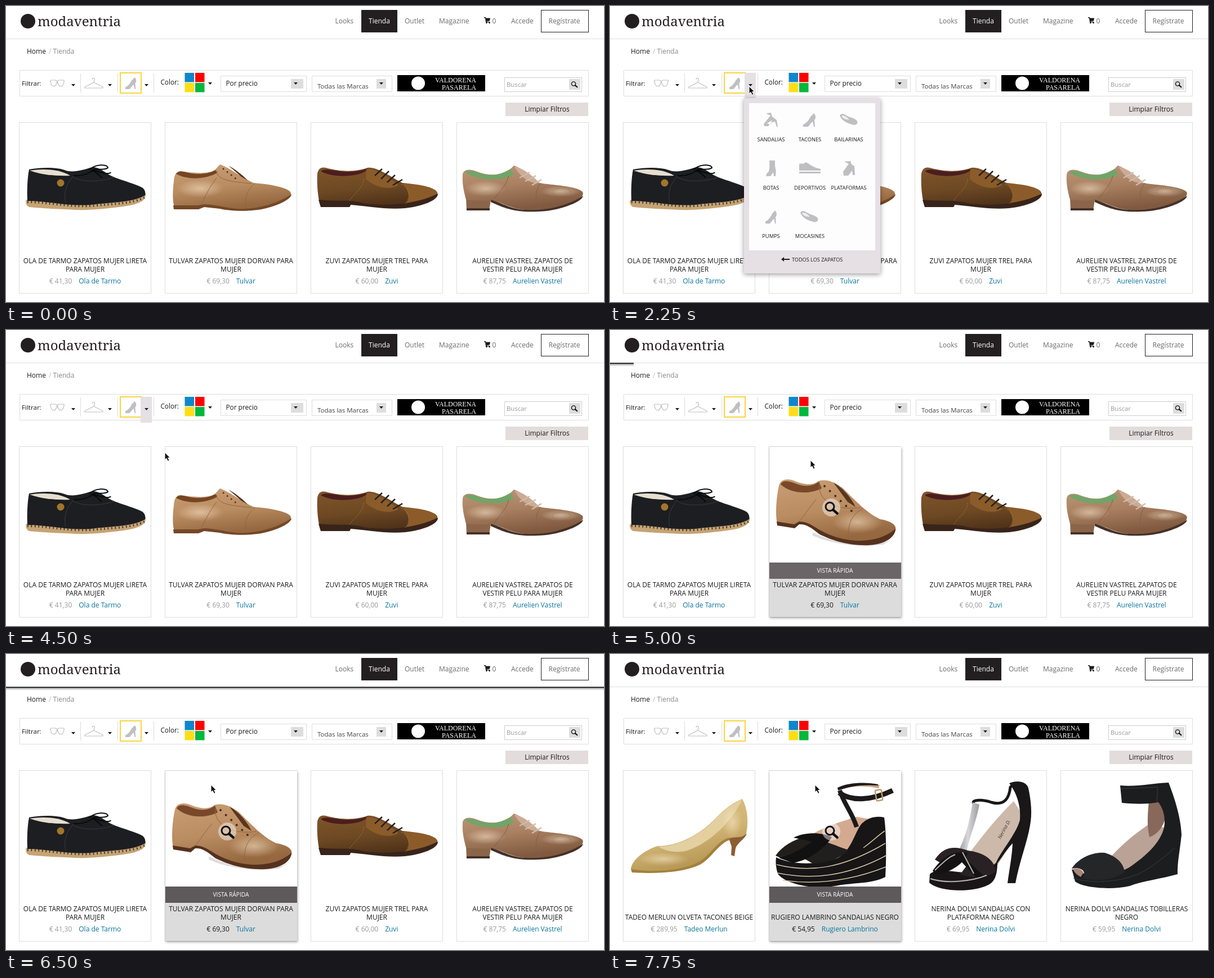
These frames come from a looping animation (1062x527 px, 8000 ms). An HTML page:

```html
<!DOCTYPE html>
<html lang="es">
<head>
<meta charset="utf-8">
<title>Tienda</title>
<style>
html, body { margin: 0; width: 100%; height: 100%; overflow: hidden; background: #fff; }
svg { display: block; width: 1062px; height: 527px; font: 12px "Open Sans", sans-serif; }
.line { fill: none; stroke: #ddd; }
.nav { fill: #6b6b6b; }
.ink { fill: #1c1a1b; }
.link { fill: #08759c; }
.price { fill: #999; }
.mid { text-anchor: middle; }
.small { font-size: 9.3px; }
.icon { fill: #bfbfc2; }
.wire { fill: none; stroke: #bfbfc2; stroke-width: 1.2; }
.pick { fill: none; stroke: #f9d442; stroke-width: 2; }
.serif { font-family: "Liberation Serif", serif; fill: #fff; text-anchor: end; }
.lift { filter: drop-shadow(1px 2px 2px #0005); }

/* every part holds its pose until the next key */
.cursor, .bar, .menu, .tab, .tacones, .old, .new, .old .hover, .old .strip, .old .rest, .old .lit {
  animation: 8s step-end infinite;
}
.cursor { animation-name: cursor; }
.bar { animation-name: bar; }
.menu { animation-name: menu; filter: drop-shadow(0 2px 4px #0006); }
.tab { animation-name: tab; }
.tacones { animation-name: tacones; }
.old { animation-name: old; }
.new { animation-name: new; }
.old .hover { animation-name: hover; }
.old .strip { animation-name: strip; }
.old .rest { animation-name: rest; }
.old .lit { animation-name: lit; }
.strip { fill: #5e595b; }
.lit { fill: #1c1a1b; }

@keyframes cursor {
  0% { transform: translate(322px, 149px); visibility: hidden; }
  3.125% { transform: translate(322px, 149px); visibility: visible; }
  6.25% { transform: translate(303px, 148px); }
  9.375% { transform: translate(278px, 146px); }
  12.5% { transform: translate(255px, 143px); }
  15.625% { transform: translate(243px, 141px); }
  28.125% { transform: translate(247px, 143px); }
  31.25% { transform: translate(258px, 176px); }
  34.375% { transform: translate(296px, 214px); }
  37.5% { transform: translate(335px, 262px); }
  40.625% { transform: translate(348px, 303px); }
  43.75% { transform: translate(352px, 276px); }
  46.875% { transform: translate(355px, 232px); }
  50% { transform: translate(354px, 212px); }
  53.125% { transform: translate(336px, 212px); }
  56.25% { transform: translate(282px, 218px); }
  59.375% { transform: translate(322px, 226px); }
  62.5% { transform: translate(356px, 232px); }
  65.625%, 100% { transform: translate(364px, 233px); visibility: visible; }
}
@keyframes bar {
  0% { transform: translateX(-1070px); }
  62.5% { transform: translateX(-1020px); }
  65.625% { transform: translateX(-957px); }
  68.75% { transform: translateX(-705px); }
  71.875% { transform: translateX(-452px); }
  75% { transform: translateX(-302px); }
  78.125% { transform: translateX(-151px); }
  81.25% { transform: translateX(0); }
  93.75%, 100% { transform: translateX(-1070px); }
}
@keyframes menu { 0%, 56.25%, 100% { visibility: hidden; } 28.125% { visibility: visible; } }
@keyframes tab { 0%, 59.375%, 100% { visibility: hidden; } 28.125% { visibility: visible; } }
@keyframes tacones { 0%, 56.25%, 100% { opacity: 0; } 34.375% { opacity: 1; } }
@keyframes old { 0% { opacity: 1; } 93.75%, 100% { opacity: 0; } }
@keyframes new { 0% { opacity: 0; } 93.75%, 100% { opacity: 1; } }
@keyframes hover { 0% { opacity: 0; } 59.375% { opacity: .5; } 62.5%, 100% { opacity: 1; } }
@keyframes rest { 0% { opacity: 1; } 62.5%, 100% { opacity: 0; } }
@keyframes strip { 0% { fill: #6c6568; } 68.75%, 100% { fill: #5e595b; } }
@keyframes lit { 0% { fill: #999; } 62.5%, 100% { fill: #1c1a1b; } }
</style>
</head>
<body>
<svg viewBox="0 0 1062 527">
  <defs>
    <linearGradient id="tan" x2=".3" y2="1"><stop stop-color="#c99e74"/><stop offset=".55" stop-color="#ba8c61"/><stop offset="1" stop-color="#966840"/></linearGradient>
    <linearGradient id="brown" x2=".3" y2="1"><stop stop-color="#80552a"/><stop offset=".6" stop-color="#6c4823"/><stop offset="1" stop-color="#50331a"/></linearGradient>
    <linearGradient id="bronze" x2=".3" y2="1"><stop stop-color="#bd977a"/><stop offset=".5" stop-color="#a98061"/><stop offset="1" stop-color="#80593f"/></linearGradient>
    <linearGradient id="beige" x2=".4" y2="1"><stop stop-color="#dcc48b"/><stop offset=".6" stop-color="#d0b473"/><stop offset="1" stop-color="#b39452"/></linearGradient>
    <linearGradient id="silver" x2="1"><stop stop-color="#8b8b8d"/><stop offset=".5" stop-color="#d8d8da"/><stop offset="1" stop-color="#9a9a9c"/></linearGradient>
    <linearGradient id="shade" x2="0" y2="1"><stop stop-color="#000" stop-opacity=".28"/><stop offset="1" stop-color="#000" stop-opacity="0"/></linearGradient>
    <radialGradient id="sheen"><stop stop-color="#fff0d8" stop-opacity=".5"/><stop offset="1" stop-color="#fff0d8" stop-opacity="0"/></radialGradient>
    <path id="down" d="M0 0H7L3.5 4Z"/>
    <path id="heel" d="M0 20C5 18 10 13 13 6L19 0C23 4 23 9 20 12L21 24H19L17 15C13 17 11 23 8 24H1Q-1 23 0 20Z"/>
    <g id="flat"><path d="M0 4C3-1 8 1 12 4C18 8 27 8 31 14C33 19 28 22 22 20C14 18 3 13 0 4Z"/><path d="M3 5C7 2 12 6 17 11C11 12 5 9 3 5Z" fill="#eee"/></g>
    <g id="lens" fill="none" stroke="#111"><circle r="7.5" stroke-width="3"/><path d="M5.5 5.5L13 12" stroke-width="4.5" stroke-linecap="round"/></g>

    <g id="espadrille">
      <path d="M36 345C70 346 110 356 150 352C190 349 230 349 248 334C249 345 240 351 220 355C190 360 150 364 125 363C100 362 60 360 41 358C36 355 34 350 36 345Z" fill="#c6a374"/>
      <path d="M38 347C37 330 38 305 41 291C60 288 85 286 104 292C118 298 136 292 153 287C166 286 176 297 188 303C206 311 232 317 243 324Q249 330 247 337C225 350 190 349 150 354C110 357 75 347 38 347Z" fill="#1d1e21"/>
      <path d="M42 293C62 290 92 289 114 302C92 303 64 301 42 293Z" fill="#e6dfcf"/>
      <path d="M38 349C75 349 110 358 150 356C190 352 225 352 246 341" fill="none" stroke="#2a2420" stroke-width="4" stroke-dasharray="1.5 5"/>
      <path d="M120 302Q141 304 158 290M148 292C158 281 180 281 181 288C176 293 165 289 156 292C168 298 184 300 186 296M152 292Q161 296 170 306" fill="none" stroke="#08090a" stroke-width="2"/>
      <path d="M118 303C130 315 170 313 192 305M119 304C104 320 103 337 106 350" fill="none" stroke="#3a3b3f"/>
      <circle cx="97" cy="315" r="6.5" fill="#a2752a"/>
    </g>
    <g id="oxford">
      <path d="M298 312C299 300 302 295 309 294C332 297 358 300 371 292L380 282C400 289 421 308 440 315C466 317 497 322 505 331C509 339 500 344 490 348C470 359 440 365 415 364C395 362 370 357 350 355L341 360H300C295 350 296 328 298 312Z" fill="url(#tan)"/>
      <ellipse cx="345" cy="325" rx="42" ry="16" fill="url(#sheen)"/>
      <path d="M302 299C307 293 313 294 324 297C342 301 360 299 372 292L375 297C355 309 322 310 302 299Z" fill="#744623"/>
      <path d="M395 284C406 290 419 300 430 311L418 304Z" fill="#51301c"/>
      <path d="M297 355H341L352 353C380 354 400 363 425 361C460 359 490 347 507 335C507 344 482 356 458 361C435 366 402 366 380 361L352 358L342 362H298Z" fill="#744827"/>
      <path d="M374 293C374 310 400 313 436 316M347 353C354 338 360 325 374 306M427 360C422 341 430 325 442 316" fill="none" stroke="#8f6642"/>
      <path d="M386 290L414 312" stroke="#493126" stroke-width="3" stroke-linecap="round" stroke-dasharray="0 9"/>
    </g>
    <g id="brogue">
      <path d="M553 298C555 289 560 286 568 288C600 297 625 294 642 288C660 286 680 303 704 315C730 319 762 322 766 332C767 343 745 350 720 355C695 360 660 356 630 350L613 350L611 357H559C553 340 552 313 553 298Z" fill="url(#brown)"/>
      <path d="M559 294C566 288 580 293 600 295C617 296 632 293 643 289C637 304 580 308 559 294Z" fill="#4b1d1e"/>
      <path d="M704 315C739 318 766 323 766 335C755 346 733 352 707 355C722 341 714 328 704 315ZM640 290C660 291 682 306 697 319C682 328 657 324 639 308Z" fill="#8b5c2a"/>
      <path d="M555 345C580 348 605 345 627 349C665 358 725 355 767 334C768 346 738 357 709 360C675 363 640 356 612 354L610 358H559Z" fill="#38241a"/>
      <path d="M655 302L668 290M666 308L680 294M677 314L691 301M687 319L704 309" stroke="#242020" stroke-width="2.5"/>
      <path d="M635 308C635 325 614 337 610 347M702 317C719 325 718 342 709 352" fill="none" stroke="#b07b3b" stroke-dasharray="2 2"/>
    </g>
    <g id="derby">
      <path d="M817 342L861 345L858 364H818Z" fill="#8b6549"/>
      <path d="M811 300C812 291 823 289 837 295C857 303 880 302 894 292L902 284C915 288 932 304 947 315C970 319 1013 320 1024 331C1028 340 1013 348 996 353C970 365 940 367 914 362C890 358 878 348 861 346C844 347 828 346 817 345C812 327 810 314 811 300Z" fill="url(#bronze)"/>
      <ellipse cx="852" cy="325" rx="36" ry="14" fill="url(#sheen)"/>
      <ellipse cx="985" cy="330" rx="36" ry="10" fill="url(#sheen)"/>
      <path d="M815 296C821 289 837 297 855 301C872 302 886 296 896 290L902 299C886 313 838 312 815 296Z" fill="#72a468"/>
      <path d="M903 286C920 289 935 303 948 315C934 317 916 309 903 286Z" fill="#cbab95"/>
      <path d="M912 306L930 296M922 312L941 302M934 319L951 309" stroke="#d0bbaa" stroke-width="2.5"/>
      <path d="M861 345C881 350 895 362 925 363C964 365 1002 353 1025 338C1023 350 977 366 944 366C905 368 885 360 861 349ZM818 360H859V364H818Z" fill="#443128"/>
      <path d="M893 302C888 322 873 333 867 344M950 315C938 330 940 350 947 362" fill="none" stroke="#81604a"/>
      <ellipse cx="986" cy="331" rx="16" ry="7" fill="none" stroke="#896a53" stroke-width="1.5" stroke-dasharray="1 3"/>
    </g>
    <g id="tilted">
      <path d="M360 360C410 385 465 387 500 373L485 382C445 388 393 381 360 366Z" fill="#ddd"/>
      <path d="M300 277C303 266 313 264 326 268C345 276 360 277 370 269C386 264 400 272 413 281C435 303 456 326 480 337C500 340 510 348 507 357C500 372 480 380 455 379C425 379 400 370 377 360C360 350 350 342 335 344L327 351L297 345C293 325 296 295 300 277Z" fill="url(#tan)"/>
      <ellipse cx="440" cy="342" rx="45" ry="20" fill="url(#sheen)"/>
      <path d="M303 275C307 266 319 269 334 275C350 280 362 277 371 270L376 282C352 294 321 291 303 275Z" fill="#79482a"/>
      <path d="M397 272C414 281 429 300 436 315L422 306Z" fill="#59361f"/>
      <path d="M296 341L327 346L336 341C357 341 367 357 394 366C432 381 480 378 507 354C507 367 492 381 461 383C425 385 392 374 371 363C357 351 347 345 336 346L328 353L297 348Z" fill="#55321d"/>
      <path d="M372 273C368 300 395 323 445 316M336 341C346 330 354 315 366 302M425 374C420 345 430 328 449 318" fill="none" stroke="#8f6642"/>
      <path d="M381 278L430 323" stroke="#462b1c" stroke-width="4" stroke-linecap="round" stroke-dasharray="0 13"/>
    </g>
    <g id="pump">
      <path d="M211 328L243 320C239 330 226 336 223 346L221 360L215 358L216 343Z" fill="#8d5c32"/>
      <path d="M37 382C40 366 60 350 84 342C120 342 158 324 190 290C205 274 220 264 235 258C245 276 246 301 242 319C236 329 222 325 212 328C190 335 181 359 160 372C130 388 70 392 40 388Z" fill="url(#beige)"/>
      <path d="M86 343C122 342 160 324 191 290C205 275 220 265 234 260C221 290 183 335 137 350C117 355 99 351 86 343Z" fill="#e3cfa0"/>
      <ellipse cx="95" cy="365" rx="45" ry="12" fill="url(#sheen)"/>
      <ellipse cx="217" cy="300" rx="18" ry="28" fill="url(#sheen)"/>
      <path d="M37 383C80 390 132 385 160 369C181 355 189 334 211 327L213 331C193 337 181 363 160 375C126 391 73 391 39 389Z" fill="#a4803d"/>
    </g>
    <g id="wedge">
      <path d="M336 338C364 312 405 300 438 290L475 296L481 322L402 366L337 366Z" fill="#d3aa8f"/>
      <path d="M406 241C425 231 455 231 478 236" fill="none" stroke="#c9a288" stroke-width="6"/>
      <path d="M404 238C425 228 455 228 476 232L476 234C450 232 425 235 405 243Z" fill="#1b1919"/>
      <path d="M407 247C428 262 462 262 502 243" fill="none" stroke="#1b1919" stroke-width="9"/>
      <path d="M408 243C416 268 430 282 438 308" fill="none" stroke="#1b1919" stroke-width="8"/>
      <rect x="472" y="242" width="11" height="19" rx="2" fill="none" stroke="#c39a6c" stroke-width="2.5" transform="rotate(-9 477 251)"/>
      <path d="M295 362C328 378 375 374 405 363C430 348 434 318 447 302C460 290 474 288 487 291C491 321 491 365 489 397C462 410 437 406 400 413C350 421 306 405 298 391Q293 376 295 362Z" fill="#171515"/>
      <path d="M294 359C306 342 326 330 349 325C383 332 404 343 424 349C410 363 387 372 360 373L327 354L307 365Z" fill="#211e1e"/>
      <path d="M326 327C348 316 378 318 394 326C383 344 355 367 325 372L300 363C326 357 346 343 359 334Z" fill="#111"/>
      <path d="M296 375C352 389 410 384 489 337M298 390C357 402 419 397 490 359M307 403C365 411 427 404 490 379M450 345C467 333 477 322 488 315" fill="none" stroke="#d2c0a5" stroke-width="1.5"/>
    </g>
    <g id="tstrap">
      <path d="M636 358C662 322 690 288 717 262L736 292L724 320L688 376L650 382Z" fill="#cdb9a9"/>
      <path d="M646 266C641 260 659 258 677 264C701 271 709 256 711 237L720 229" fill="none" stroke="#191718" stroke-width="5"/>
      <path d="M709 230C724 224 740 227 743 239C748 262 750 285 746 305C741 335 727 370 720 408H706C709 385 714 360 715 337C705 347 696 362 684 378C686 360 722 322 728 295C730 270 722 247 709 230Z" fill="#191718"/>
      <path d="M644 264L656 268C650 302 637 326 632 361L615 359C632 325 638 302 644 264Z" fill="url(#silver)"/>
      <path d="M568 392C585 375 631 398 666 386C676 381 682 374 688 370C688 392 684 405 672 411C639 427 582 422 567 407Z" fill="#1a1617"/>
      <path d="M577 366C593 341 614 342 636 350C661 353 684 365 685 388C666 401 640 399 622 392L638 371L608 359L594 376Z" fill="#2a2124"/>
      <path d="M573 386C589 363 608 349 635 354C630 373 604 389 580 393ZM613 358L622 356L667 398L653 401Z" fill="#151213"/>
      <path d="M577 385C591 372 600 362 613 357M626 353L646 391M569 400C599 410 644 404 669 394" fill="none" stroke="#b4b4b6" stroke-width="2"/>
      <text font-size="9" font-style="italic" fill="#413833" transform="translate(694 330) rotate(-62)">Nerina D.</text>
    </g>
    <g id="cuff">
      <path d="M885 366C912 335 939 315 962 300L990 312L947 387L884 388Z" fill="#baa396"/>
      <path d="M957 262C972 259 987 266 986 294C980 312 970 322 958 326C953 306 955 284 957 262Z" fill="#88685a"/>
      <path d="M906 234C935 237 962 230 992 229C1001 252 1014 290 1015 322C1012 350 1007 374 1008 392C980 400 946 404 923 413C889 421 839 416 826 405L820 383C856 401 899 393 922 380C952 360 984 331 985 300C985 284 981 274 974 264C950 268 930 267 909 265Z" fill="#1c1d1f"/>
      <path d="M820 382C832 363 858 352 879 354C899 360 912 372 914 388C896 404 857 405 839 399C848 386 836 379 820 382Z" fill="#252628"/>
      <path d="M823 399C860 411 911 404 940 391C965 379 986 359 1004 345M907 240L973 237L971 264" fill="none" stroke="#3b3c3f"/>
      <path d="M822 383Q834 379 841 389L836 397Q826 392 822 383Z" fill="#a78778"/>
    </g>
  </defs>

  <rect width="1062" height="527" fill="#fff"/>
  <g id="shop"></g>

  <path class="line" d="M0 58.5H1062"/>
  <circle cx="39" cy="27" r="13" fill="#231f20"/>
  <text x="56" y="36" font-size="24" font-family="Noto Serif, serif" fill="#231f20">modaventria</text>
  <g class="nav">
    <text x="584.5" y="31">Looks</text><text x="708" y="31">Outlet</text><text x="769" y="31">Magazine</text>
    <text x="863.5" y="31">0</text><text x="897" y="31">Accede</text><text x="963.5" y="31">Regístrate</text>
  </g>
  <rect x="631" y="7" width="64" height="40" fill="#231f20"/>
  <text class="mid" x="663" y="31" fill="#fff">Tienda</text>
  <rect x="950.5" y="7.5" width="84" height="39" fill="none" stroke="#231f20"/>
  <g class="ink">
    <path d="M849 20H852L852.5 21.5H860L859 26.5L853.5 27.5V28H859.5V29H852L851 21.5H849Z"/>
    <circle cx="853.5" cy="30" r="1.3"/><circle cx="858.5" cy="30" r="1.3"/>
  </g>

  <text x="37" y="85" class="ink">Home</text><text x="76" y="85" fill="#bbb">/</text><text x="83.5" y="85" fill="#888">Tienda</text>

  <path class="line" d="M24.5 114.5H1034.5V160.5H24.5ZM132.5 120V154M198.5 120V154M262.5 120V154M381.5 124.5H533.5V152.5H381.5ZM543.5 124.5H685.5V152.5H543.5Z"/>
  <text x="28" y="142" font-size="11.6" class="ink">Filtrar:</text>
  <g class="wire">
    <path d="M78 134L80 132H88L91 134Q89 143 85 143Q80 143 79 134M104 134L102 132H94L91 134Q93 143 97 143Q102 143 103 134"/>
    <path d="M153 131C153 127 159 128 157 132L156 136L140 144V146H172V144L156 136"/>
  </g>
  <rect class="pick" x="203" y="119" width="37" height="36"/>
  <use href="#heel" class="icon" transform="translate(212 127) scale(.87)"/>
  <rect class="tab" x="239" y="119" width="20" height="46" fill="#e4e0e4"/>
  <g class="ink" id="arrows"></g>
  <text x="274.5" y="140" font-size="11.7" class="ink">Color:</text>
  <g id="swatches"></g>
  <text x="390.5" y="142" font-size="11.8" class="ink">Por precio</text>
  <text x="553" y="146.5" font-size="11.5" fill="#444">Todas las Marcas</text>
  <rect x="695" y="123" width="156" height="29"/>
  <circle cx="732" cy="137.5" r="12" fill="#fff"/>
  <text class="serif" x="835" y="135.5">VALDORENA</text><text class="serif" x="835" y="149">PASARELA</text>
  <rect x="885.5" y="127.5" width="137" height="25" fill="none" stroke="#ccc"/>
  <text x="889" y="143.5" font-size="11.3" fill="#999">Buscar</text>
  <rect x="1000" y="130" width="20" height="19" fill="#ddd"/>
  <use href="#lens" transform="translate(1008 138.5) scale(.48)"/>
  <rect x="887" y="172" width="147" height="24" fill="#e2dcdd"/>
  <text class="mid ink" x="961" y="188">Limpiar Filtros</text>

  <g class="menu">
    <rect x="238" y="164" width="242" height="312" fill="#e6e0e4"/>
    <rect x="247" y="173" width="224" height="262" fill="#fdfdfd"/>
    <rect class="pick tacones" x="324" y="176.5" width="62" height="70"/>
    <g class="icon">
      <path d="M273 210L285 195L277 191L286 190L288 197L296 203L298 215H296L293 206L287 207L281 214H274ZM279 209L284 211L288 203Z"/>
      <use href="#heel" x="343" y="191"/>
      <use href="#flat" x="408" y="191"/>
      <path d="M283 275H293V285C295 293 295 296 294 303H291L290 296L285 303H278C276 301 279 297 282 295C284 287 283 281 283 275Z"/>
      <path d="M336 281C341 279 344 283 347 278C354 280 358 287 374 290V293H336ZM336 295H374V298H336Z"/>
      <path d="M414 295L424 281L416 277L427 276L429 282L434 285L435 301H431L430 293L423 302H415Z"/>
      <use href="#heel" transform="translate(276 364) scale(.9 .98)"/>
      <use href="#flat" x="338" y="364"/>
    </g>
    <g class="mid ink small" id="kinds"></g>
    <path class="ink" d="M304 451L309 447V450H319V452H309V455Z"/>
    <text class="ink" font-size="9.15" x="323" y="454.5">TODOS LOS ZAPATOS</text>
  </g>

  <g class="bar">
    <rect x="-8" y="61" width="1070" height="4" fill="url(#shade)"/>
    <rect x="-8" y="58.5" width="1070" height="2" fill="#111"/>
  </g>
  <path class="cursor" d="M0 0V13L3 10.5L5.5 15.5L8 14.3L5.7 9.5H9.5Z" fill="#111" stroke="#fff"/>
</svg>
<script>
const $ = id => document.getElementById(id);
const box = (x, y, w, h, fill) => `<rect x="${x}" y="${y}" width="${w}" height="${h}" fill="${fill}"/>`;

const arrows = [[116, 139], [181, 139], [246, 139], [359, 136], [511, 136], [663, 136]];
$("arrows").innerHTML = box(506, 130, 22, 17, "#ddd") + box(658, 130, 17, 17, "#ddd") +
  arrows.map(([x, y]) => `<use href="#down" x="${x}" y="${y}"/>`).join("");

$("swatches").innerHTML = ["#0e87cc", "#f00", "#ffdd16", "#00b83c"].map((color, i) =>
  box(317.5 + i % 2 * 18.5, 119 + Math.floor(i / 2) * 18, 16.5, 16.5, color)).join("");

const kinds = ["SANDALIAS", "TACONES", "BAILARINAS", "BOTAS", "DEPORTIVOS", "PLATAFORMAS", "PUMPS", "MOCASINES"];
$("kinds").innerHTML = kinds.map((kind, i) =>
  `<text x="${286 + i % 3 * 69}" y="${240.5 + Math.floor(i / 3) * 86}">${kind}</text>`).join("");

const oldShoes = [
  ["espadrille", "OLA DE TARMO ZAPATOS MUJER LIRETA|PARA MUJER", "41,30", "Ola de Tarmo"],
  ["oxford", "TULVAR ZAPATOS MUJER DORVAN PARA|MUJER", "69,30", "Tulvar", "tilted"],
  ["brogue", "ZUVI ZAPATOS MUJER TREL PARA|MUJER", "60,00", "Zuvi"],
  ["derby", "AURELIEN VASTREL ZAPATOS DE|VESTIR PELU PARA MUJER", "87,75", "Aurelien Vastrel"]
];
const newShoes = [
  ["pump", "TADEO MERLUN OLVETA TACONES BEIGE", "289,95", "Tadeo Merlun"],
  ["wedge", "RUGIERO LAMBRINO SANDALIAS NEGRO", "54,95", "Rugiero Lambrino", "wedge"],
  ["tstrap", "NERINA DOLVI SANDALIAS CON|PLATAFORMA NEGRO", "69,95", "Nerina Dolvi"],
  ["cuff", "NERINA DOLVI SANDALIAS TOBILLERAS|NEGRO", "59,95", "Nerina Dolvi"]
];

const hoverLayer = shoe => `<g class="hover">
  <rect class="lift" x="283" y="208" width="234" height="303" fill="#fff"/>
  ${box(283, 443, 234, 68, "#dcdcdc")}
  <use href="#${shoe}"/>
  <rect class="strip" x="283" y="414" width="234" height="29"/>
  <text class="mid" x="399.5" y="432" font-size="10.2" fill="#fff">VISTA RÁPIDA</text>
  <circle cx="393" cy="316" r="16" fill="#fff" opacity=".45"/>
  <use href="#lens" x="390.5" y="314.5"/></g>`;

function card([shoe, title, price, brand, hoverShoe], i) {
  const x = 23.5 + i * 259, cx = x + 117;
  const lines = title.split("|");
  const text = lines.map((line, n) =>
    `<text class="mid ink" x="${cx}" y="${473 - (lines.length - 1 - n) * 15}">${line}</text>`).join("");
  return `<rect class="line" x="${x}" y="207.5" width="234" height="304"/>
    <use href="#${shoe}" class="${hoverShoe ? "rest" : ""}"/>
    ${hoverShoe ? hoverLayer(hoverShoe) : ""}${text}
    <text class="mid" x="${cx}" y="494"><tspan class="${hoverShoe ? "lit" : "price"}">€ ${price}</tspan><tspan class="link" dx="12">${brand}</tspan></text>`;
}
const shelf = (name, shoes) => `<g class="${name}">${shoes.map(card).join("")}</g>`;
$("shop").innerHTML = shelf("old", oldShoes) + shelf("new", newShoes);
</script>
</body>
</html>
```
